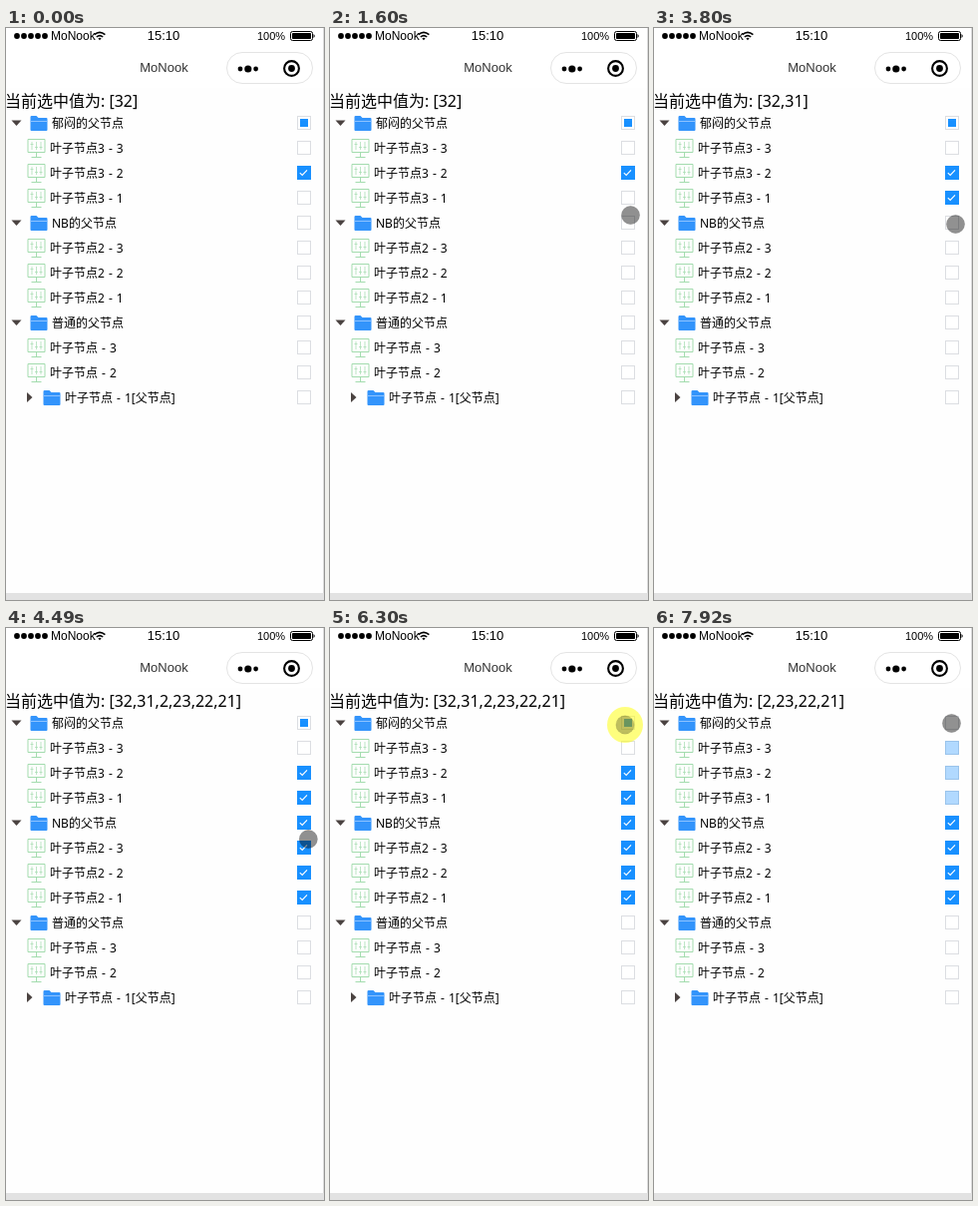
An HTML page that plays this animation: 319 px wide and 573 px high, repeating every 8000 ms.

```html
<!DOCTYPE html>
<html lang="zh">
<head>
<meta charset="utf-8">
<title>Tree picker</title>
<style>
  html, body { margin: 0; width: 100%; height: 100%; overflow: hidden; background: #fff; }
  svg { display: block; width: 100vw; height: 100vh; }
  text { font-family: "Noto Sans", "Noto Sans CJK SC", "Noto Sans CJK", sans-serif; fill: #000; white-space: pre; }
  .ui { font-family: "Liberation Sans", Arial, sans-serif; }
  .row { font-size: 12px; word-spacing: .9px; }
</style>
</head>
<body>
<svg id="stage" viewBox="0 0 319 573">
  <defs>
    <g id="folder">
      <path d="M0 1.2Q0 0 1.2 0H6L8 2H16Q17 2 17 3.2V14Q17 15 16 15H1Q0 15 0 14Z" fill="#3394fb"/>
      <path d="M0 5.5H17" stroke="#8cc2ff"/>
    </g>
    <g id="board" fill="none" stroke="#a3dcae">
      <path d="M.5 .5H17.5V13.5H.5ZM9 14V18M4 18.5H14"/>
      <path d="M4.5 3V11M9 3V11M13.5 3V11M3 5.5H6M7.5 8.5H10.5M12 8.5H15" stroke-width=".7"/>
    </g>
  </defs>
  <rect width="319" height="573" fill="#fff"/>
  <rect y="60" width="318" height="506" fill="#fefefe"/>
  <rect x="318" width="1" height="567" fill="#dcdcdc"/>
  <rect y="566" width="319" height="7" fill="#e2e2e2"/>

  <g id="signal"></g>
  <text class="ui" x="45" y="12" font-size="12">MoNook</text>
  <g fill="none" stroke="#000" stroke-width="1.6">
    <path d="M88.6 6.6Q94 2 99.4 6.6M90.8 9Q94 6.2 97.2 9"/>
    <path d="M92.4 10.4L94 12.2L95.6 10.4Q94 9 92.4 10.4Z" fill="#000" stroke="none"/>
  </g>
  <text class="ui" x="158" y="12" font-size="13" text-anchor="middle">15:10</text>
  <text class="ui" x="252" y="12" font-size="11">100%</text>
  <rect x="285.5" y="3.5" width="22" height="9" rx="2" fill="none" stroke="#000"/>
  <rect x="287" y="5" width="19" height="6" rx=".8"/>
  <path d="M308.5 6Q311 8 308.5 10Z"/>

  <text class="ui" x="158.5" y="43.5" font-size="13" text-anchor="middle" style="fill:#333">MoNook</text>
  <rect x="221.5" y="24.5" width="86" height="31" rx="15.5" fill="#fff" stroke="#e4e4e4"/>
  <circle cx="235" cy="41" r="2.4"/>
  <circle cx="242.8" cy="41" r="3.6"/>
  <circle cx="250.6" cy="41" r="2.4"/>
  <circle cx="286.5" cy="40.5" r="7.4" fill="none" stroke="#000" stroke-width="2.1"/>
  <circle cx="286.5" cy="40.5" r="3.4"/>

  <text id="picked" x="-1" y="79" font-size="16"></text>
  <g id="tree"></g>
  <g id="pointer">
    <circle id="halo" r="18" fill="#ff0" fill-opacity=".5"/>
    <circle id="dot" r="9.2" stroke="#000" stroke-opacity=".1" stroke-width=".8"/>
  </g>
</svg>
<script>
const LOOP = 8000, START = 428, TICK = 77.9;
const FADE = 3, DELAY = 3; // in ticks
const BLUE = "#1890ff";
const $ = id => document.getElementById(id);
const clamp = v => Math.max(0, Math.min(1, v));

function add(parent, tag, attrs, text) {
  const el = document.createElementNS("http://www.w3.org/2000/svg", tag);
  for (const name in attrs) el.setAttribute(name, attrs[name]);
  if (text) el.textContent = text;
  parent.appendChild(el);
  return el;
}

for (let i = 0; i < 5; i++) add($("signal"), "circle", { cx: 11 + 7 * i, cy: 8, r: 2.9 });

// a leaf's id starts with the id of its parent
const nodes = [];
["郁闷", "NB", "普通"].forEach((name, i) => {
  const group = 3 - i;
  nodes.push({ id: `${group}`, label: `${name}的父节点`, kind: "open" });
  for (let j = 3; j > 0; j--) {
    nodes.push({ id: `${group}${j}`, label: `叶子节点${group > 1 ? group : ""} - ${j}` });
  }
});
const last = nodes[nodes.length - 1];
last.kind = "closed";
last.label += "[父节点]";

nodes.forEach((node, i) => {
  const g = add($("tree"), "g", { transform: `translate(0 ${95 + 25 * i})` });
  let x = 44;
  if (node.kind) {
    const open = node.kind === "open";
    x = open ? 46 : 59;
    add(g, "path", { d: open ? "M5.5 -2.5H15.5L10.5 3Z" : "M21 -5L26.5 0L21 5Z", fill: "#4a4240" });
    add(g, "use", { href: "#folder", x: x - 21.5, y: -7 });
  } else {
    add(g, "use", { href: "#board", x: 21.5, y: -9 });
  }
  add(g, "text", { class: "row", x, y: 5 }, node.label);

  const box = add(g, "g", { transform: "translate(299 0)" });
  const square = { x: -6.5, y: -6.5, width: 13, height: 13 };
  add(box, "rect", { ...square, fill: "#fff", stroke: "#dcdee2" });
  node.half = add(box, "rect", { x: -4, y: -4, width: 8, height: 8, fill: BLUE });
  node.fill = add(box, "rect", { ...square, fill: BLUE, stroke: BLUE });
  node.mark = add(box, "path", { d: "M-4.2 .2L-1.8 2.5L3 -2.6", fill: "none", stroke: "#fff", "stroke-width": 1.1 });
});

// each click toggles a node with everything below it
const clicks = [{ at: 30, id: "31" }, { at: 45, id: "2" }, { at: 75, id: "3" }, { at: 91, id: "3" }];
const states = [{ tick: -99, picked: ["32"] }];
for (const { at, id } of clicks) {
  const { picked } = states[states.length - 1];
  const family = nodes.map(n => n.id).filter(n => n.startsWith(id));
  states.push({
    tick: at + DELAY,
    id,
    picked: picked.includes(id)
      ? picked.filter(n => !family.includes(n))
      : [...picked, ...family.filter(n => !picked.includes(n))]
  });
}

// fill of a box from 0 to 1; the clicked box leads its children by a tick
function level(id, k) {
  return states.reduce((value, s) => {
    const lead = s.id === id ? 1 : 0;
    const target = s.picked.includes(id) ? 1 : 0;
    return value + (target - value) * clamp((k - s.tick + lead) / FADE);
  }, 0);
}

// pointer strokes: first tick, last tick, end point, optional bend
const entry = [300, 562];
const strokes = [
  [0, 4, 345, 150, 254, 425],
  [5, 12, 298.5, 173.5, 270, 150],
  [13, 15, 301.5, 187.5],
  [16, 20, 296, 169],
  [31, 37, 300, 215],
  [38, 43, 302.5, 196.5],
  [46, 57, 304, 224],
  [58, 63, 304.5, 82.5, 311, 150],
  [64, 70, 296, 97],
  [76, 81, 298.5, 95.5]
];

function place(k) {
  let [x, y] = entry;
  for (const [from, to, ex, ey, bx = (x + ex) / 2, by = (y + ey) / 2] of strokes) {
    const u = clamp((k - from) / (to - from)), v = 1 - u;
    x = v * v * x + 2 * u * v * bx + u * u * ex;
    y = v * v * y + 2 * u * v * by + u * u * ey;
    if (u < 1) break;
  }
  return [x, y];
}

function draw(time) {
  // the screen refreshes on a fixed tick
  const k = Math.floor((time % LOOP - START) / TICK);
  const { picked } = states.filter(s => k >= s.tick).pop();
  $("picked").textContent = `当前选中值为: [${picked}]`;

  for (const { id, half, fill, mark } of nodes) {
    const value = level(id, k), on = picked.includes(id);
    fill.setAttribute("opacity", value);
    mark.setAttribute("transform", `scale(${on ? value : 0})`);
    half.setAttribute("opacity", !on && picked.some(n => n.startsWith(id)) ? 1 : 0);
  }

  const pressed = clicks.some(c => k === c.at || k === c.at + 1);
  $("pointer").setAttribute("visibility", k >= 0 ? "visible" : "hidden");
  $("pointer").setAttribute("transform", `translate(${place(k)})`);
  $("halo").setAttribute("opacity", pressed ? 1 : 0);
  $("dot").setAttribute("fill-opacity", pressed ? .25 : .43);
}

function loop() {
  draw(performance.now());
  requestAnimationFrame(loop);
}
loop();
</script>
</body>
</html>
```
